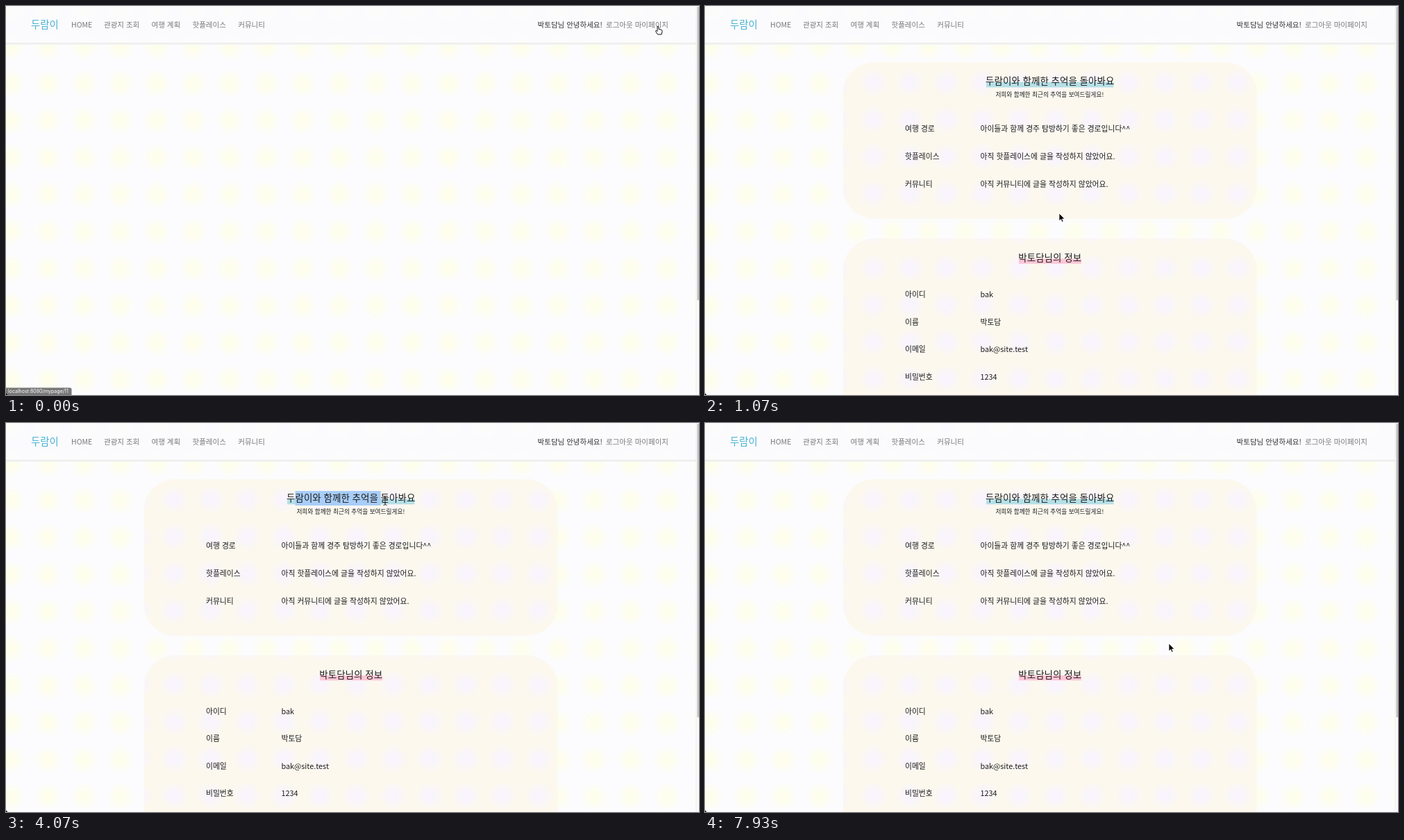
These frames come from a looping animation (998x561 px, 8 s). An HTML page:

```html
<!DOCTYPE html>
<html lang="ko">
<head>
<meta charset="utf-8">
<style>
  html, body { margin: 0; width: 100%; height: 100%; overflow: hidden; background: #fcfcfe; }
  svg { display: block; width: 100%; height: 100%; }
  text { font-family: "Noto Sans CJK KR", "Noto Sans CJK", sans-serif; font-size: 10.8px; fill: #1c1c1c; white-space: pre; }
  .nav { font-size: 10.5px; font-weight: 300; fill: #777; }
  .nav.dark { fill: #333; }
  .logo { font-size: 14.4px; font-weight: 300; fill: #48b2d2; }
  .title { font-size: 13.5px; text-anchor: middle; }
  .sub { font-size: 8.66px; text-anchor: middle; }
  .status { font: 7px Inter, sans-serif; fill: #fff; }
</style>
</head>
<body>
<svg id="stage" viewBox="0 0 998 561">
  <defs>
    <radialGradient id="yellow">
      <stop offset=".25" stop-color="#fefeec"/>
      <stop offset="1" stop-color="#fefeec" stop-opacity="0"/>
    </radialGradient>
    <radialGradient id="lavender">
      <stop offset=".25" stop-color="#f9f4fd"/>
      <stop offset="1" stop-color="#f9f4fd" stop-opacity="0"/>
    </radialGradient>
    <pattern id="pageDots" x="33.7" y="31.6" width="52.5" height="53.4" patternUnits="userSpaceOnUse">
      <circle cx="26.2" cy="26.7" r="21" fill="url(#yellow)"/>
    </pattern>
    <pattern id="cardDots" x="6.3" y="30.3" width="52.5" height="53.4" patternUnits="userSpaceOnUse">
      <circle cx="26.2" cy="26.7" r="21" fill="url(#lavender)"/>
    </pattern>
  </defs>

  <rect width="998" height="561" fill="#fcfcfe"/>
  <rect width="998" height="561" fill="url(#pageDots)"/>
  <g id="cards"></g>

  <g id="header">
    <rect width="994" height="54" fill="#fcfcfe" opacity=".85"/>
    <rect y="53.3" width="994" height="1.2" fill="#e4e4e4"/>
    <rect y="54.5" width="994" height="1.5" fill="#f3f3f3"/>
  </g>

  <rect x="994" width="4" height="561" fill="#fafafa"/>
  <rect x="993.6" width=".7" height="561" fill="#e8e8e8"/>
  <rect x="995.4" y="1" width="2.6" height="423.5" rx="1.3" fill="#c1c1c1"/>

  <g id="status">
    <path d="M0 550.5H92Q94.5 550.5 94.5 553V561H0Z" fill="#222"/>
    <text class="status" x="3" y="558.4">localhost:8080/mypage/11</text>
  </g>
  <path d="M0 557Q.3 560.5 3 561H0Z" fill="#000"/>
  <rect id="badge" x="538.5" y="265.5" width="14" height="14" fill="#1fcb8f"/>

  <g id="cursor">
    <path id="arrow" d="M0 0V11L2.6 8.7L4.3 12.5L6.1 11.7L4.5 8H8Z" fill="#000" stroke="#fff" stroke-width=".8"/>
    <path id="beam" d="M-2.5 -5.5Q0 -5.5 0 -4Q0 -5.5 2.5 -5.5M0 -4V4M-2.5 5.5Q0 5.5 0 4Q0 5.5 2.5 5.5M-1.3 2H1.3" fill="none" stroke="#222" stroke-width=".9"/>
    <path id="hand" d="M-2 -5Q-1 -6.6 0 -5V-1.5L4 -.7Q5.2 -.2 5 1.5L4 6H-1.5L-4.4 1.6Q-4.6 0 -3 .6L-2 1.6Z" fill="#fff" stroke="#111" stroke-width="1"/>
  </g>
</svg>

<script>
const LOOP = 8000;
const $ = id => document.getElementById(id);

function add(parent, tag, attrs, content = '') {
  const node = document.createElementNS('http://www.w3.org/2000/svg', tag);
  for (const key in attrs) node.setAttribute(key, attrs[key]);
  node.textContent = content;
  parent.append(node);
  return node;
}
const label = (parent, x, y, content, cls = '') => add(parent, 'text', { x, y, class: cls }, content);
const box = (parent, x, y, width, height, fill, rx = 0) =>
  add(parent, 'rect', { x, y, width, height, fill, rx });

label($('header'), 36, 32.3, '두람이', 'logo');
[[94, 'HOME'], [141, '관광지 조회'], [209.5, '여행 계획'], [268.5, '핫플레이스'], [334.3, '커뮤니티'],
 [864, '로그아웃'], [905.7, '마이페이지']].forEach(([x, name]) => label($('header'), x, 30.8, name, 'nav'));
label($('header'), 765.6, 30.8, '박토담님 안녕하세요!', 'nav dark');

function makeCard(top, height, start) {
  const g = add($('cards'), 'g', {});
  box(g, 199, top, 595.5, height, '#fcf8ee', 45);
  box(g, 199, top, 595.5, height, 'url(#cardDots)', 45);
  return { g, start };
}

const SELECT = '#a8cdf8';
const memories = makeCard(81, 226, 290);
const profile = makeCard(335, 330, 340);

box(memories.g, 405, 109.5, 183.5, 7.8, '#b5dfe6');
const titleMark = box(memories.g, 417, 98, 0, 21, SELECT);
const title = label(memories.g, 496.7, 113.2, '두람이와 함께한 추억을 돌아봐요', 'title');
label(memories.g, 496.3, 131.3, '저희와 함께한 최근의 추억을 보여드릴게요!', 'sub');

const rows = [
  ['여행 경로', '아이들과 함께 경주 탐방하기 좋은 경로입니다^^', 333, 613],
  ['핫플레이스', '아직 핫플레이스에 글을 작성하지 않았어요.', 340.5, 591],
  ['커뮤니티', '아직 커뮤니티에 글을 작성하지 않았어요.', 330, 581],
].map(([name, value, nameEnd, valueEnd], i) => {
  const y = 177.2 + i * 39.7;
  const nameMark = box(memories.g, 288, y - 8.5, 0, 17, SELECT);
  const valueMark = box(memories.g, 396.5, y - 8.5, 0, 17, SELECT);
  return {
    nameMark, valueMark, nameEnd, valueEnd,
    name: label(memories.g, 288, y + 4, name),
    value: label(memories.g, 396.5, y + 4, value),
  };
});

box(profile.g, 452, 364, 90, 7.3, '#ffc6d6');
label(profile.g, 496.7, 368, '박토담님의 정보', 'title');
[['아이디', 'bak'], ['이름', '박토담'], ['이메일', 'bak@site.test'], ['비밀번호', '1234']]
  .forEach(([name, value], i) => {
    const y = 419.6 + i * 39.6;
    label(profile.g, 288, y, name);
    label(profile.g, 396.5, y, value);
  });

// Pointer path: time, x, y, shape used from that time on
const path = [
  [0, 940, 35, 'hand'], [130, 925, 48, 'arrow'], [530, 561, 265, 'arrow'], [1070, 510, 299, 'arrow'],
  [2130, 120, 340, 'arrow'], [2600, 160, 310, 'arrow'], [3250, 417, 110, 'beam'], [3450, 417, 110, 'beam'],
  [4070, 546, 113, 'beam'], [4350, 560, 113, 'beam'], [4700, 480, 145, 'arrow'], [5150, 288, 177, 'beam'],
  [5300, 288, 177, 'beam'], [5700, 440, 190, 'beam'], [6150, 537, 257, 'beam'], [6470, 572, 258, 'beam'],
  [6850, 600, 275, 'arrow'], [7400, 655, 310, 'arrow'], [7930, 668, 318, 'arrow'], [8000, 668, 318, 'arrow'],
];

const clamp = v => Math.max(0, Math.min(1, v));
const show = (node, visible) => node.style.display = visible ? '' : 'none';

// cubic-bezier(.25, .1, .25, 1)
function ease(x) {
  const curve = (u, a, b) => 3 * u * (1 - u) * ((1 - u) * a + u * b) + u ** 3;
  let low = 0, high = 1;
  for (let i = 0; i < 24; i++) {
    const mid = (low + high) / 2;
    if (curve(mid, .25, .25) < x) low = mid; else high = mid;
  }
  return curve(low, .1, 1);
}

function pointerAt(time) {
  const i = path.findIndex(p => p[0] > time) - 1;
  const [t0, x0, y0, shape] = path[i], [t1, x1, y1] = path[i + 1];
  const k = (time - t0) / (t1 - t0), s = k * k * (3 - 2 * k);
  return { x: x0 + (x1 - x0) * s, y: y0 + (y1 - y0) * s, shape };
}

// Nearest gap between two letters
function snap(text, x) {
  let best = text.getStartPositionOfChar(0).x;
  for (let i = 0; i < text.getNumberOfChars(); i++)
    for (const edge of [text.getStartPositionOfChar(i).x, text.getEndPositionOfChar(i).x])
      if (Math.abs(edge - x) < Math.abs(best - x)) best = edge;
  return best;
}

function markTo(rect, end) {
  rect.setAttribute('width', Math.max(0, end - rect.getAttribute('x')));
}

function drawSelection(time) {
  const titleOn = time >= 3450 && time < 4700;
  const titleStart = title.getStartPositionOfChar(1).x;
  titleMark.setAttribute('x', titleStart);
  markTo(titleMark, titleOn ? snap(title, pointerAt(Math.min(time, 4350)).x - 1) : titleStart);

  const rowsOn = time >= 5300 && time < 6850;
  const p = pointerAt(Math.min(time, 6150));
  const current = Math.max(0, Math.min(2, Math.round((p.y - 177) / 39.7)));
  rows.forEach((row, i) => {
    const full = rowsOn && i < current, partial = rowsOn && i === current;
    const inValue = partial && p.x > 390;
    markTo(row.nameMark, full || inValue ? row.nameEnd : partial ? snap(row.name, p.x) : 0);
    markTo(row.valueMark, full ? row.valueEnd : inValue ? snap(row.value, p.x) : 0);
  });
}

function draw(time) {
  for (const { g, start } of [memories, profile]) {
    const p = ease(clamp((time - start) / 800));
    g.setAttribute('transform', `translate(0 ${100 * (1 - p)})`);
    g.setAttribute('opacity', Math.min(1, p * 1.4));
  }
  $('status').setAttribute('opacity', Math.min(.6 + time / 200, 1) * clamp((1000 - time) / 150));
  drawSelection(time);
  show($('badge'), time >= 6250 && time < 6850);

  const { x, y, shape } = pointerAt(time);
  $('cursor').setAttribute('transform', `translate(${x} ${y})`);
  for (const name of ['arrow', 'beam', 'hand']) show($(name), name === shape);
}

const begin = performance.now();
function tick() {
  draw((performance.now() - begin) % LOOP);
  requestAnimationFrame(tick);
}
tick();
</script>
</body>
</html>
```
